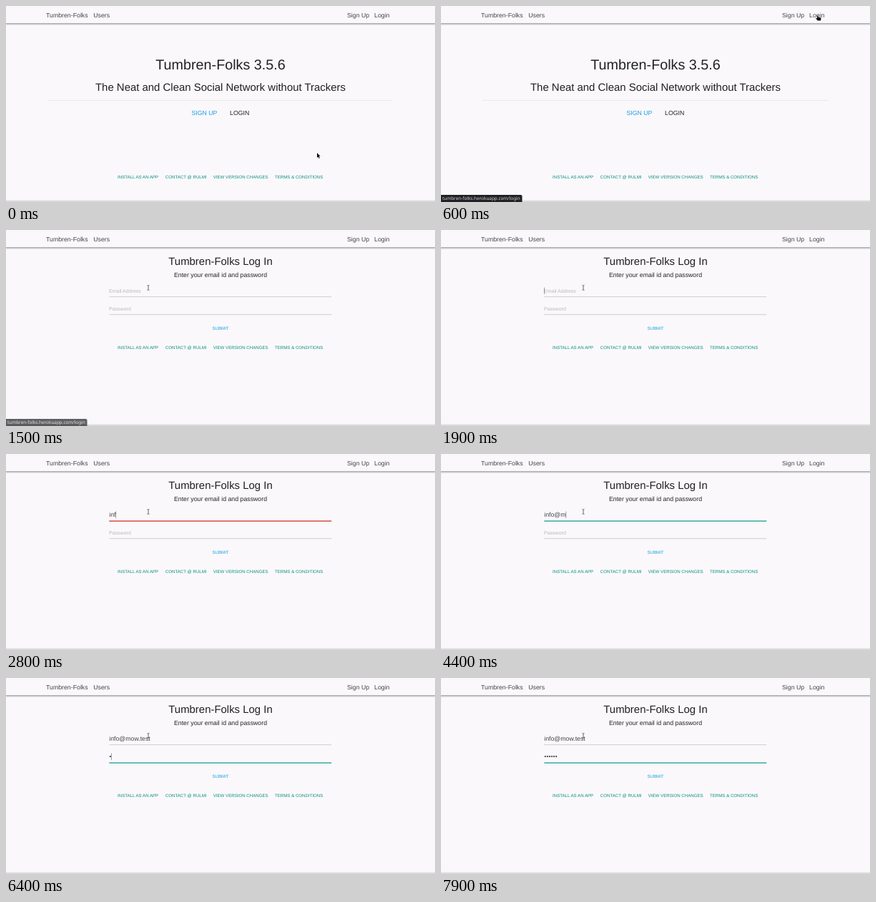
Recreate the animation shown at these times as an HTML page. Size 600 by 275 pixels, loop 8000 ms.

```html
<!DOCTYPE html>
<html lang="en">
<head>
<meta charset="utf-8">
<title>Log in</title>
<style>
  html, body { margin: 0; width: 100%; height: 100%; overflow: hidden; background: #faf8fb; }
  svg { display: block; width: 600px; height: 275px; }
  text { font-family: "Liberation Sans", Arial, sans-serif; font-size: 8.78px; fill: #212121; text-rendering: geometricPrecision; }
  .mid { text-anchor: middle; }
  .nav text { fill: #444; }
  .h1 { font-size: 19.77px; }
  .h2 { font-size: 14.93px; }
  .blue { fill: #1a9fe0; }
  .small { font-size: 6.15px; }
  .foot text { font-size: 6.13px; fill: #0a9080; }
  .hint { font-size: 7.03px; fill: #b9b8ba; }
  .value { fill: #444; }
  .url { font-family: "Noto Sans", sans-serif; font-size: 6.38px; fill: #d4d5d8; }
</style>
</head>
<body>
<svg viewBox="0 0 600 275">
  <defs>
    <linearGradient id="navShade" x2="0" y2="1">
      <stop offset="0" stop-color="#9c9b9d"/>
      <stop offset=".35" stop-color="#c4c3c5"/>
      <stop offset="1" stop-color="#faf8fb"/>
    </linearGradient>
    <linearGradient id="endShade" x2="0" y2="1">
      <stop offset="0" stop-color="#faf8fb"/>
      <stop offset="1" stop-color="#cfced0"/>
    </linearGradient>
  </defs>
  <rect width="600" height="275" fill="#faf8fb"/>
  <rect y="24" width="600" height="3.4" fill="url(#navShade)"/>
  <rect y="271.5" width="600" height="3.5" fill="url(#endShade)"/>

  <g class="nav">
    <text x="56" y="15.7">Tumbren-Folks</text>
    <text x="122.2" y="15.7">Users</text>
    <text x="477" y="15.7">Sign Up</text>
    <text x="515" y="15.7">Login</text>
  </g>

  <g id="home">
    <text class="h1 mid" x="300" y="89">Tumbren-Folks 3.5.6</text>
    <text class="h2 mid" x="300" y="118.6">The Neat and Clean Social Network without Trackers</text>
    <rect x="58" y="132.3" width="483" height=".6" fill="#dddcde"/>
    <text class="blue" x="259.4" y="153.2">SIGN UP</text>
    <text x="313" y="153.2" fill="#333">LOGIN</text>
  </g>

  <g id="login">
    <text class="h2 mid" x="300" y="49.3">Tumbren-Folks Log In</text>
    <text class="mid" x="300" y="66">Enter your email id and password</text>
    <text id="mailHint" class="hint" x="144" y="88.3">Email Address</text>
    <text id="passHint" class="hint" x="144" y="113.3">Password</text>
    <text id="mail" class="value" x="144.2" y="88.3"></text>
    <g id="dots" fill="#444"></g>
    <rect id="mailLine" x="144.3" width="311"/>
    <rect id="passLine" x="144.3" width="311"/>
    <rect id="caret" width=".55" height="9.4" fill="#555"/>
    <text class="small blue mid" x="300" y="140.2">SUBMIT</text>
  </g>

  <g id="foot" class="foot">
    <text x="156" y="167.3">INSTALL AS AN APP</text>
    <text x="222.8" y="167.3">CONTACT @ RULMI</text>
    <text x="289.7" y="167.3">VIEW VERSION CHANGES</text>
    <text x="376" y="167.3">TERMS &amp; CONDITIONS</text>
  </g>

  <g id="status">
    <path d="M0 265H111.5Q113.5 265 113.5 267V275H0Z" fill="#202124"/>
    <text class="url" x="2" y="272.2">tumbren-folks.herokuapp.com/login</text>
  </g>

  <g id="pointer">
    <path id="arrow" d="M0 0V7L1.6 5.5L2.7 8L3.8 7.5L2.7 5.1H4.7Z" fill="#111" stroke="#fff" stroke-width=".5" paint-order="stroke"/>
    <path id="hand" d="M0 .6Q.7-.3 1.3.6V2.8L4.6 3.3Q5.7 3.6 5.6 4.8L5 7.6H.8L-1.8 4.6Q-1.8 3.6-.8 4L0 4.6Z" fill="#111" stroke="#fff" stroke-width=".5" paint-order="stroke"/>
    <path id="beam" d="M-1.5-3.4Q0-3.4 0-2.6Q0-3.4 1.5-3.4M0-2.6V2.6M-1.5 3.4Q0 3.4 0 2.6Q0 3.4 1.5 3.4" fill="none" stroke="#444" stroke-width=".8"/>
  </g>
</svg>
<script>
const LOOP = 8000;
const ADDRESS = 'info@mow.test';
const MAIL_KEYS = [2500, 2700, 2800, 3000, 3800, 4400, 4500, 4600, 4700, 4800, 5000, 5300, 5400];
const PASS_KEYS = [6300, 6600, 6800, 7000, 7100, 7300];
const FOCUS = 1900, TAB = 5700, FADE = 300, BLINK = 600;
const PATH = [[100, 435, 206], [400, 526, 13], [600, 526, 13], [800, 334, 154], [950, 318, 146], [1400, 199, 81]];
const GREY = [190, 189, 191], RED = [220, 62, 56], TEAL = [38, 166, 154];

const $ = id => document.getElementById(id);
const clamp = v => Math.min(1, Math.max(0, v));
const ease = v => v * v * (3 - 2 * v);
const mix = (a, b, k) => a + (b - a) * k;
const show = (id, on) => $(id).setAttribute('visibility', on ? 'inherit' : 'hidden');
const typed = (keys, t) => keys.filter(k => k <= t).length;

for (let i = 0; i < PASS_KEYS.length; i++) {
  const dot = document.createElementNS('http://www.w3.org/2000/svg', 'circle');
  dot.setAttribute('cx', 145.8 + i * 3.07);
  dot.setAttribute('cy', 110.1);
  dot.setAttribute('r', 1.15);
  $('dots').append(dot);
}

function place(t) {
  let a = PATH[0];
  for (const b of PATH) {
    if (t < b[0]) {
      const k = ease(clamp((t - a[0]) / (b[0] - a[0])));
      return [mix(a[1], b[1], k), mix(a[2], b[2], k)];
    }
    a = b;
  }
  return [a[1], a[2]];
}

function drawLine(id, y, color, k) {
  const rgb = GREY.map((g, i) => Math.round(mix(g, color[i], k)));
  $(id).setAttribute('fill', `rgb(${rgb})`);
  $(id).setAttribute('y', y);
  $(id).setAttribute('height', mix(0.7, 1.4, k));
}

function drawForm(t) {
  const n = typed(MAIL_KEYS, t), p = typed(PASS_KEYS, t);
  const text = ADDRESS.slice(0, n);
  $('mail').textContent = text;
  show('mailHint', !n);
  show('passHint', !p);
  [...$('dots').children].forEach((d, i) => d.setAttribute('visibility', i < p ? 'inherit' : 'hidden'));

  const valid = /@\w+(\.\w+)*$/.test(text);
  const toPass = clamp((t - TAB) / FADE);
  drawLine('mailLine', 93.4, valid ? TEAL : RED, clamp((t - FOCUS) / FADE) * (1 - toPass));
  drawLine('passLine', 118.4, TEAL, toPass);

  const inPass = t >= TAB;
  const last = Math.max(FOCUS, ...[...MAIL_KEYS, TAB, ...PASS_KEYS].filter(k => k <= t));
  const end = inPass ? p * 3.07 : n && $('mail').getComputedTextLength();
  show('caret', t >= FOCUS && (t - last) % (2 * BLINK) < BLINK);
  $('caret').setAttribute('x', 144.3 + end);
  $('caret').setAttribute('y', inPass ? 105.6 : 80.6);
}

function draw(t) {
  const onLogin = t >= 700;
  show('home', !onLogin);
  show('login', onLogin);
  $('foot').setAttribute('transform', `translate(0 ${onLogin ? 0 : 74.9})`);
  drawForm(t);

  show('status', t >= 400 && t < 1850);
  $('status').setAttribute('opacity', 1 - clamp((t - 1350) / 500));

  const [x, y] = place(t);
  const kind = t < 350 ? 'arrow' : t < 950 ? 'hand' : t < 1250 ? 'arrow' : 'beam';
  for (const id of ['arrow', 'hand', 'beam']) show(id, id === kind);
  $('pointer').setAttribute('transform', `translate(${x} ${y})`);
}

const start = performance.now();
function tick() {
  draw((performance.now() - start) % LOOP);
  requestAnimationFrame(tick);
}
tick();
</script>
</body>
</html>
```
